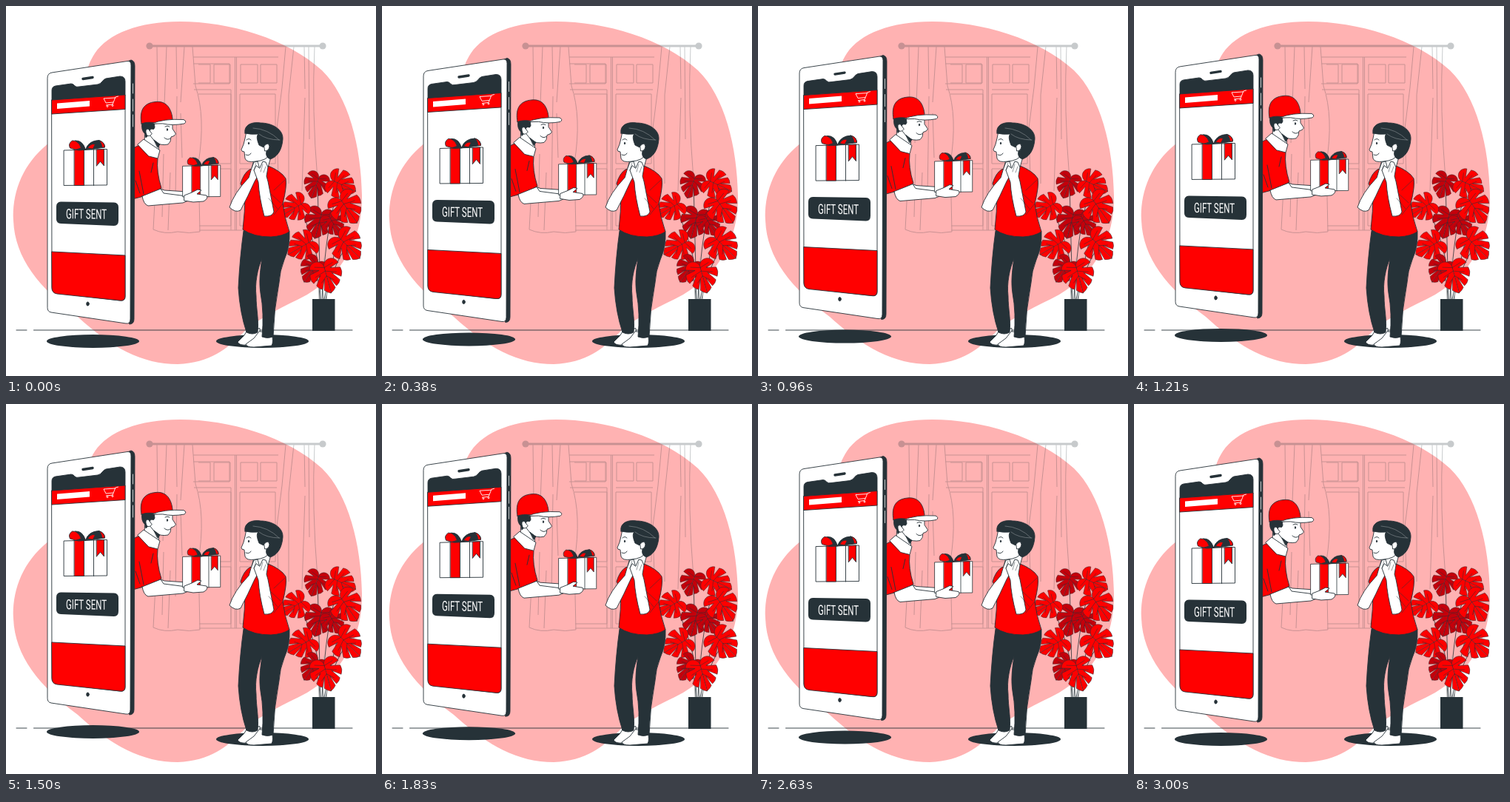
Write an HTML page that moves like this. It is 500 px wide and 500 px high and loops after 3.04 s.

```html
<!DOCTYPE html>
<html lang="en">
<head>
<meta charset="utf-8">
<title>Gift sent</title>
<style>
html, body { margin: 0; width: 100%; height: 100%; overflow: hidden; background: #fff; }
svg { display: block; width: 100vw; height: 100vh; }
.ink { stroke: #263238; stroke-width: .9; stroke-linejoin: round; stroke-linecap: round; }
.fine { stroke-width: .5; }
.line { fill: none; }
.w { fill: #fff; }
.r { fill: #f00; }
.d { fill: #263238; }
text { font: 400 18.5px Roboto, "Open Sans", Arial, sans-serif; fill: #fff; text-anchor: middle; }
</style>
</head>
<body>
<svg viewBox="0 0 500 500">
<defs>
  <g id="gift" class="ink">
    <path class="w" d="M0 1L58-.5V48L0 48.500Z"/>
    <path class="r" d="M14 .5L27 0V48.500H14Z"/>
    <path class="line" d="M40 0V48.500"/>
    <path class="r" d="M44 0L54-.5V22L49 16L44 22Z"/>
    <path class="r" d="M29 0Q22-13 11-12Q5-8 8-2L19 1Z"/>
    <path class="d" d="M29 0Q25-13 15-12Q22-8 23-2L17 0Z"/>
    <path class="d" d="M29 0Q33-12 47-12.500Q55-10 55-3L41-1Z"/>
    <path class="r" d="M47-12.500Q55-10 55-3L51-3Q51-9 47-12.500ZM32-2Q36-9 42-7L39-1Z"/>
  </g>
  <g id="leaf" class="ink fine"></g>
</defs>

<path fill="#ffb2b2" d="M235 21C180 21 138 37 120 64C106 85 107 106 98 130C88 158 73 172 50 192C20 219 8 256 10 290C12 341 45 381 97 420C143 462 184 484 232 484C276 482 298 464 322 440C345 419 377 406 407 390C456 361 482 315 481 256C480 190 463 122 427 87C380 44 302 21 235 21Z"/>

<!-- window, curtains and floor -->
<g stroke="#263238" fill="none" opacity=".25">
  <path stroke-width="3" d="M194 54H428"/>
  <g class="d" stroke="none"><circle cx="194" cy="54" r="4.600"/><circle cx="428" cy="54" r="4.600"/></g>
  <path d="M204 55Q207 180 199 302Q214 309 232 305Q248 308 262 305L260 212Q270 150 256 108L252 55M217 55L212 185M213 200L211 285M230 55L231 112M231 122L229 260M241 55L236 130M236 145L238 205M222 225L219 303"/>
  <path d="M253 69H368M253 78H302V105H253M260 79H276V104H260M281 79H303V104H281ZM317 79H340V104H317ZM344 79H366V104H344ZM309.500 69V303M311.500 69V303M254 113H304V303M260 119H304V213H264M316 113H366M316 119H364V213H316ZM262 220H304V297H261M316 220V297H364V220ZM261 303H368"/>
  <path d="M378 55Q374 110 366 165L370 302M389 55L382 120V240M403 55L404 112M404 124L400 250M409 55L410 180M417 55Q413 140 421 235"/>
</g>
<path class="ink line" d="M14 438H28M37.500 438H468"/>

<!-- plant -->
<g class="line" stroke="#263238" stroke-width=".8">
  <path d="M425 396L421 240M427 396Q432 290 452 241M429 396Q420 310 394 271M430 396Q444 330 459 273M432 396Q437 360 462 321M424 396Q423 350 403 325"/>
  <path stroke="#aaa" d="M423 396L421 350M428.500 396L430 340M433.500 396L435 350"/>
</g>
<g id="plant"></g>
<path class="d" d="M414 396H444.500V439H414Z"/>

<!-- recipient -->
<ellipse class="d" cx="346.500" cy="453" rx="62.500" ry="9"/>
<g class="ink">
  <path class="w" d="M326 438L322 445L313 454Q315 459 326 458L343 445V436Z"/>
  <path class="w" d="M342 440L335 449L324 457Q325 461 335 461L359 459Q362 454 359 442Z"/>
  <path class="d" d="M321 304Q316 340 314 381Q316 414 325 441Q333 445 340 441C342 424 338 410 338 392C336 374 340 355 346 341C343 360 342 374 344 388Q349 415 346 447Q353 450 361 447Q362 410 369 374Q370 358 376 343Q384 325 383 305Z"/>
  <path class="r" d="M329 221Q321 226 317 240L323 253Q323 278 320 302Q334 312 358 312Q374 311 383 305Q376 285 374 267Q380 243 378 233Q372 223 352 215Z"/>
  <path class="w" d="M336 205L332 219Q342 226 354 218L358 204Z"/>
  <path class="w" d="M325 169Q323 180 321 187L318 194Q318 197 322 197L323 206Q325 212 337 210Q352 209 357 200L359 181L340 166Z"/>
  <path class="d" d="M323 172C321 161 332 156 344 158C360 158 375 167 374 180C373 194 367 204 357 207Q350 204 352 196Q357 194 355 188Q352 184 348 191L342 188Q337 176 341 173Q331 174 323 172Z"/>
  <path class="line" style="stroke:#8b9295;stroke-width:.6" d="M334 165Q354 166 369 181M342 173Q352 181 370 181"/>
  <path class="w" d="M349 189Q355 183 356 190Q355 196 350 196Z"/>
  <ellipse class="d" cx="328" cy="185.500" rx=".6" ry="1.500"/>
  <path class="line" d="M325 181Q328 178 331 181M324 201Q329 203 331 199"/>
  <path class="w" d="M331 222L335 211L340 210L342 217L340 230L336 237Q327 257 317 276Q310 280 302 272Q308 253 328 232Z"/>
  <path class="w" d="M343 219L347 210L351 211L354 218L352 230L354 237L362 278Q360 285 349 284Q342 258 341 238L335 222L338 216Z"/>
  <path class="line fine" d="M335 222L338 212M344 224L347 214M348 225L351 217M355 260L367 274M357 253L371 266M374 267L362 282M362 249L377 235"/>
</g>

<!-- phone and courier -->
<g id="float">
  <ellipse class="d" cx="117.500" cy="453" rx="62.500" ry="9"/>
  <g class="ink">
    <path class="w" d="M206 246L214 249L244 251L259 247L272 250L273 257L245 263L202 260Z"/>
    <path class="w" d="M188 168L187 184L206 200L207 183Z"/>
    <path class="w" d="M194 160L193 173L202 184Q209 189 219 187Q223 184 223 177Q230 175 229 172L225 166V157Z"/>
    <path class="d" d="M184 157Q182 168 188 173L189 178L194 173Q193 167 197 166Q200 168 201 164L200 157Z"/>
    <path class="d" d="M200 181L208 187L205 191Z"/>
    <path class="w" d="M192 166Q187 166 190 174Q193 178 197 173Z"/>
    <ellipse class="d" cx="218" cy="167" rx=".6" ry="1.500"/>
    <path class="line" d="M215 163Q218 161 221 163M214 178Q218 182 222 179"/>
    <path class="r" d="M183 159C180 141 186 131 202 129.500C215 128 223 136 225 152L224 158L202 158Q191 156 183 159Z"/>
    <path class="w" d="M197 159Q213 152 240 153.500Q245 156 241 159Q225 162 212 159Z"/>
    <path class="r" d="M160 198L182 187L205 206Q203 224 210 246L205 249L186 257L160 264Z"/>
    <path class="w" d="M178 187L186 180L208 195L205 206L193 203Z"/>
    <path class="line" d="M180 223L186 254M175 236L181 253M199 212L196 225"/>
    <path class="w" d="M184 257L209 247L213 253L244 257L249 262L239 266L192 270Q186 268 184 257Z"/>
  </g>
  <use href="#gift" transform="translate(239 215.500) scale(.875)"/>
  <path class="ink w" d="M241 256L251 252L259 248L264 249L258 254L271 256Q274 260 267 264L253 265L241 263Z"/>

  <g class="ink">
    <path class="d" d="M164 75L169 73Q174 74 174 81L173 423Q173 430 167 430Z"/>
    <path class="line" style="stroke:#fff;stroke-width:.8" d="M171.500 105V118M171.500 126V142M171.500 147V163"/>
    <path class="w" d="M56 97Q56 91 62 90L164 74.500Q169 74 169 80L168 423Q168 430 162 429L61 414Q56 413 56 408Z"/>
    <path style="stroke-width:3.400" d="M104 98.500L117 96.500"/>
    <ellipse class="d" cx="110.500" cy="402.500" rx="1.800" ry="2.600"/>
    <path class="w" d="M62 127L161 120V393Q161 399 154 398L68 388Q62 387 62 381Z"/>
    <path class="d" d="M62 127V114Q62 109 67 108L88 105Q91 105 93 108Q95 110 99 109L124 106Q128 105 130 102Q132 99 135 98L154 95Q161 95 161 102V120Z"/>
    <path class="r" d="M62 127L161 120V139.500L62 146Z"/>
    <path class="r" d="M62 332L161 337V392Q161 399 154 398L69 389Q62 388 62 381Z"/>
  </g>
  <path class="w" d="M69 131.500L113 128V135.500L69 139Z"/>
  <g fill="none" stroke="#fff" stroke-width=".9">
    <path d="M152 122L148 123L144 133L135 134M132 125L148 124M132 125L135 131L145 130"/>
    <circle cx="137" cy="135.500" r="1"/><circle cx="144" cy="134.500" r="1"/>
  </g>
  <use href="#gift" transform="translate(78.500 194)"/>
  <path class="d" d="M74 264.500L146 265.500Q152 266 152 272V290Q152 297 146 297L74 294Q68 293.500 68 288V271Q68 265 74 264.500Z"/>
  <text transform="matrix(.62 .008 0 1 108.500 287.500)">GIFT SENT</text>
</g>
</svg>
<script>
const $ = id => document.getElementById(id);

// One half of a leaf, mirrored by the sign s
const half = s => `<path transform="scale(${s} 1)" d="M0-11C4-22 18-21 21-10L8-6L22-3Q24 4 20 10L8 1L17 14Q15 19 10 21L4 8L8 23Q5 27 0 29Z"/>
  <path class="line" d="M0-8L${s * 13}-12M0-3L${s * 15} 2M0 4L${s * 9} 12"/>`;
$('leaf').innerHTML = half(1) + half(-1);

const bright = '#f00', deep = '#c4000b';
// x, y, angle, size, colour
$('plant').innerHTML = [
  [420, 239, 20, .76, deep],
  [424, 289, 15, .9, deep],
  [441, 292, -30, .72, deep],
  [450, 240, -65, .86, bright],
  [393, 271, 60, .82, bright],
  [458, 270, -35, .98, bright],
  [403, 323, 60, .88, bright],
  [458, 321, -45, .98, bright],
  [416, 354, 35, .8, deep],
  [432, 361, -15, .96, bright]
].map(([x, y, a, k, c]) =>
  `<use href="#leaf" fill="${c}" transform="translate(${x} ${y}) rotate(${a}) scale(${k})"/>`).join('');

const LOOP = 3040, RISE = 1500, HEIGHT = 10;
const start = performance.now();
function draw() {
  const t = Math.min((performance.now() - start) % LOOP, 2 * RISE);
  const y = HEIGHT * (Math.abs(t / RISE - 1) - 1);
  $('float').setAttribute('transform', `translate(0 ${y.toFixed(2)})`);
  requestAnimationFrame(draw);
}
draw();
</script>
</body>
</html>
```
